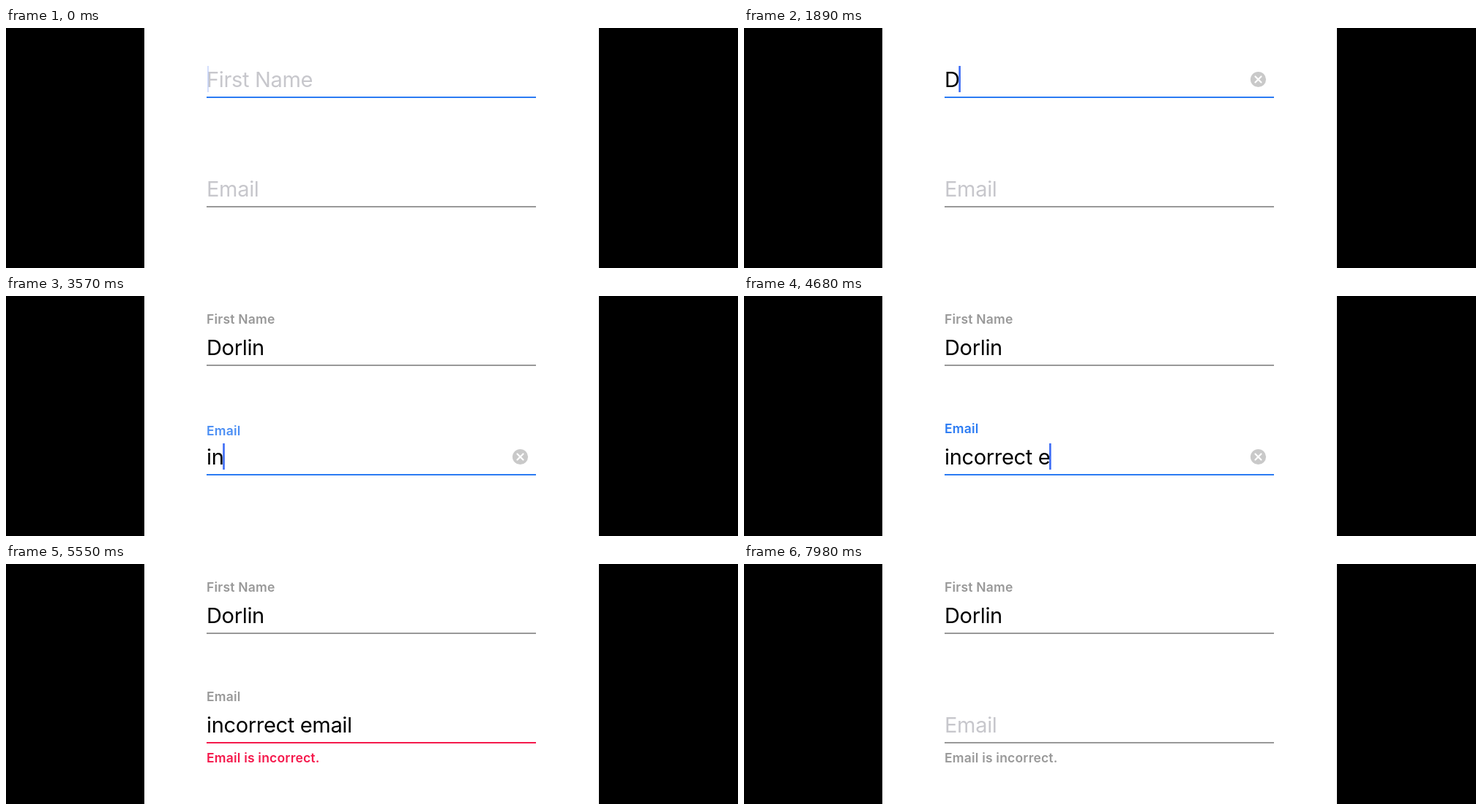
An HTML page for the animation above (8000 ms loop, 1000 by 329 pixels).

```html
<!DOCTYPE html>
<html lang="en">
<head>
<meta charset="utf-8">
<title>Form fields</title>
<style>
  html, body { margin: 0; width: 100%; height: 100%; overflow: hidden; background: #000; }
  svg { display: block; width: 100%; height: 100%; }
  text { font-family: Inter, sans-serif; white-space: pre; }
  .value { font-size: 29px; letter-spacing: -0.33px; }
  .small { font-size: 17.5px; font-weight: 600; letter-spacing: 0.2px; }
</style>
</head>
<body>
<svg id="stage" viewBox="0 0 1000 329">
  <rect x="189" width="621" height="329" fill="#fff"/>
</svg>
<script>
const LOOP = 8000;
const BLUE = '#2b7bf3', RED = '#f5194c', GREY = '#999', HINT = '#c7c7cc';
const stage = document.getElementById('stage');

function add(parent, tag, attrs, content = '') {
  const el = document.createElementNS('http://www.w3.org/2000/svg', tag);
  for (const key in attrs) el.setAttribute(key, attrs[key]);
  el.textContent = content;
  parent.append(el);
  return el;
}

function makeField(y, title) {
  const g = add(stage, 'g', { transform: `translate(274 ${y})` });
  const field = {
    title: add(g, 'text', { class: 'small', x: 0 }, title),
    hint: add(g, 'text', { class: 'value', y: 80.5, fill: HINT }, title),
    value: add(g, 'text', { class: 'value', y: 80.5 }),
    line: add(g, 'rect', { y: 94, width: 450, height: 2 }),
    caret: add(g, 'rect', { y: 52, height: 36, fill: '#3d6cf5' }),
    clear: add(g, 'g', { transform: 'translate(428.5 70.5)' }),
    error: add(g, 'text', { class: 'small', y: 121.5 }, 'Email is incorrect.')
  };
  field.disc = add(field.clear, 'circle', { r: 10.6 });
  add(field.clear, 'path', {
    d: 'M-4 -4L4 4M4 -4L-4 4', stroke: '#fff', 'stroke-width': 2.2, 'stroke-linecap': 'round'
  });
  return field;
}

const nameField = makeField(0, 'First Name');
const emailField = makeField(150, 'Email');

const ramp = (t, from, to) => Math.min(1, Math.max(0, (t - from) / (to - from)));
const easeOut = p => 1 - (1 - p) ** 2;
const within = (t, from, to) => t >= from && t < to;
const typed = (text, times, t) => text.slice(0, times.filter(at => t >= at).length);
const show = (el, alpha) => el.setAttribute('opacity', alpha);

const NAME_KEYS = [1890, 2010, 2100, 2160, 2220, 2280];
const EMAIL_KEYS = [3390, 3510, 3630, 3750, 3930, 4080, 4140, 4320, 4440, 4530,
                    4680, 4770, 4860, 4950, 5040];

// Each entry: shown from, fade-out start, gone at, optional fade-in length
const NAME_BLINKS = [[-500, -180, 60], [330, 840, 1080, 90], [1110, 1650, 1860], [1890, 2610, 2610]];
const EMAIL_BLINKS = [[2640, 3180, 3360], [3390, 5310, 5310], [6600, 7110, 7270], [7380, 7890, 8080]];

function caretAlpha(blinks, t) {
  const blink = blinks.find(([on, , gone]) => within(t, on, gone));
  if (!blink) return 0;
  const [on, out, gone, fade] = blink;
  const fadeIn = fade ? ramp(t, on - 30, on + fade) : 1;
  return fadeIn * (1 - (t < out ? 0 : ramp(t, out - 30, gone)));
}

function drawField(f, s) {
  if (f.value.textContent !== s.text) f.value.textContent = s.text;
  show(f.hint, s.text ? 0 : 1);
  const width = s.text ? f.value.getComputedTextLength() : 0;
  f.caret.setAttribute('x', s.text ? width - 1.3 : 1);
  f.caret.setAttribute('width', s.text ? 2.6 : 2);
  show(f.caret, s.caret);
  f.line.setAttribute('fill', s.line);
  f.title.setAttribute('fill', s.focus ? BLUE : GREY);
  f.title.setAttribute('y', 37.5 + 22 * (1 - s.title));
  show(f.title, s.title);
  show(f.clear, s.focus && s.text ? 1 : 0);
  f.disc.setAttribute('fill', s.pressed ? '#0d74dd' : '#c9c9c9');
  f.error.setAttribute('fill', s.errorColor || RED);
  show(f.error, s.error || 0);
}

function draw(t) {
  const nameFocus = t < 2610;
  drawField(nameField, {
    text: typed('Dorlin', NAME_KEYS, t),
    focus: nameFocus,
    line: nameFocus ? BLUE : GREY,
    caret: caretAlpha(NAME_BLINKS, t),
    title: easeOut(ramp(t, 1950, 2150))
  });

  const left = t >= 7980;
  const failed = t >= 5310;
  const emailFocus = within(t, 2610, 5310) || within(t, 6600, 7980);
  drawField(emailField, {
    text: t < 7380 ? typed('incorrect email', EMAIL_KEYS, t) : '',
    focus: emailFocus,
    line: left ? GREY : failed ? RED : emailFocus ? BLUE : GREY,
    caret: left ? 0 : caretAlpha(EMAIL_BLINKS, t),
    title: t < 7380 ? easeOut(ramp(t, 3450, 3650)) : 1 - easeOut(ramp(t, 7350, 7600)),
    pressed: within(t, 7275, 7380),
    error: easeOut(ramp(t, 5310, 5550)),
    errorColor: left ? GREY : RED
  });
}

const start = performance.now();
function tick() {
  draw((performance.now() - start) % LOOP);
  requestAnimationFrame(tick);
}
draw(0);
requestAnimationFrame(tick);
</script>
</body>
</html>
```
